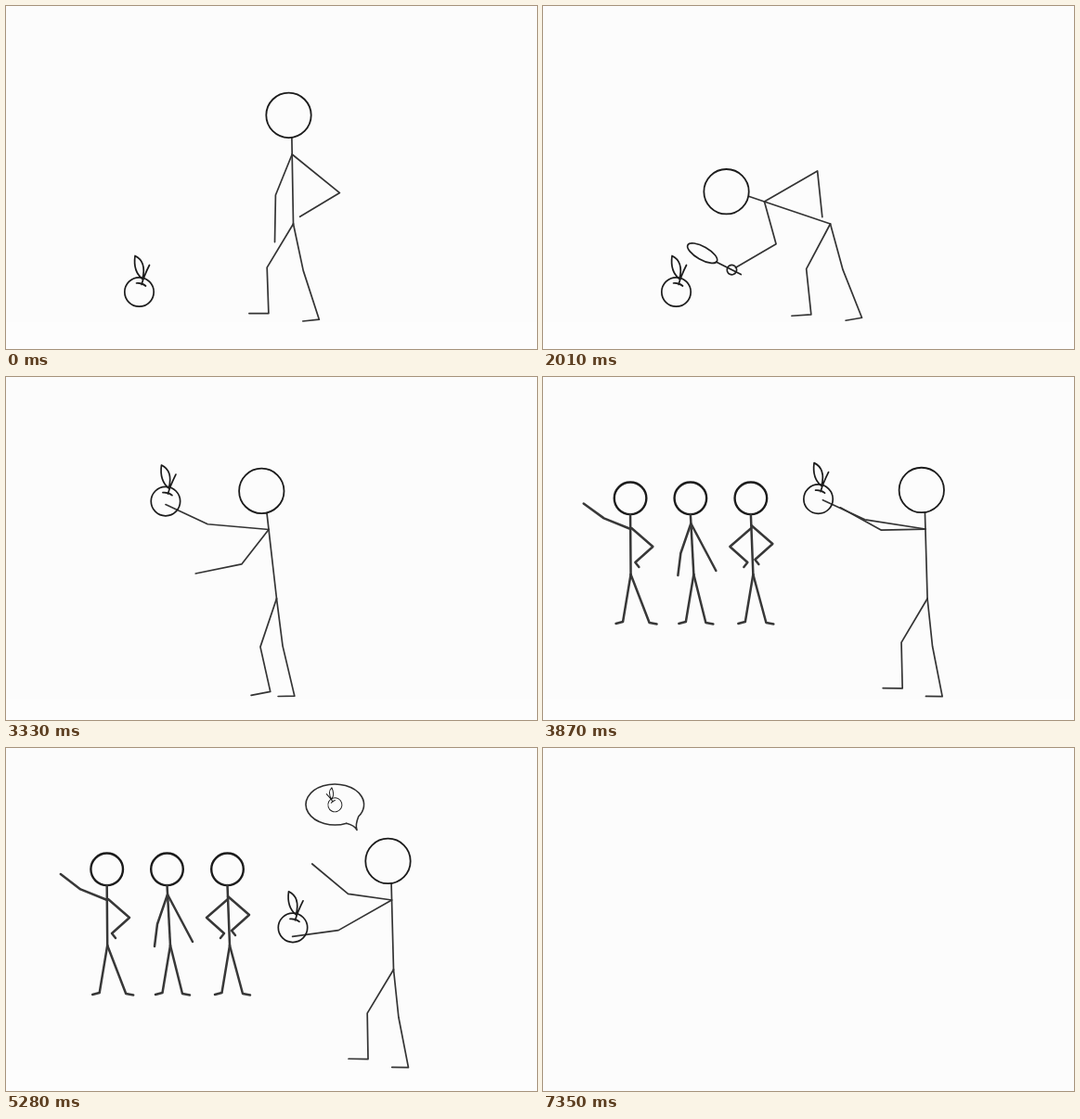
These frames come from a looping animation (572 by 370 pixels, 7.5 s). An HTML page with a canvas:

```html
<!DOCTYPE html>
<html lang="en">
<head>
<meta charset="utf-8">
<title>Sharing a discovery</title>
<style>
html, body { margin: 0; width: 100%; height: 100%; overflow: hidden; background: #fcfcfc; }
canvas { display: block; }
</style>
</head>
<body>
<canvas id="stage" width="572" height="370"></canvas>
<script>
const ctx = document.getElementById('stage').getContext('2d');
const LOOP = 7500, CUT = 2400, TAU = Math.PI * 2;

const linear = u => u;
const easeIn = u => u * u;
const easeOut = u => Math.sin(u * Math.PI / 2);
const smooth = u => u * u * (3 - 2 * u);
const span = (t, a, b) => Math.max(0, Math.min(1, (t - a) / (b - a)));
const mix = (a, b, u) => Array.isArray(a) ? a.map((v, i) => mix(v, b[i], u)) : a + (b - a) * u;

// Poses give joint angles in degrees: 0 points right, 90 points down.
// Arms are [upper, forearm], legs are [thigh, shin].
const stand = {
  hip: [309.5, 235], torso: -91, long: [39, 149], short: [112, 91],
  front: [121, 88], back: [78, 72], grip: [0, 0],
};
const lean = { ...stand, torso: -96.6, long: [34, 145], short: [107, 85], front: [120, 86.5], back: [77, 71] };
const bend = { ...stand, torso: -161.3, long: [-30, 84], short: [74.6, 149.7], front: [118, 84], back: [74.7, 68.4] };
const rise = { ...stand, torso: -94, short: [115, 160] };

const show = {
  hip: [291.5, 239], torso: -96.5, long: [185, 205], short: [128, 168.5],
  front: [108.6, 77.4], back: [82.7, 76.7], grip: [0, -3.5],
};
const low = { ...show, long: [140, 172], short: [118, 155] };
const offer = {
  hip: [417.5, 239], torso: -91.5, long: [189, 205], short: [180, 210],
  front: [121, 89], back: [84, 79], grip: [-5, -1],
};
const tell = { ...offer, long: [146, 168.5], short: [189, 221], grip: [1, -10.5] };

// Each key: time, pose, easing on the way to it
const findScene = [
  [0, stand], [700, stand], [900, lean, easeIn], [1590, bend, easeOut], [2010, bend], [2370, rise, smooth],
];
const shareScene = [
  [CUT, low], [3100, show, smooth], [3330, show], [3930, offer, smooth], [4800, offer], [5400, tell, smooth],
];

function poseAt(keys, t) {
  const next = keys.findIndex(k => k[0] > t);
  if (next < 0) return keys[keys.length - 1][1];
  const [start, from] = keys[next - 1], [end, to, ease = linear] = keys[next];
  const u = ease(span(t, start, end)), pose = {};
  for (const part in from) pose[part] = mix(from[part], to[part], u);
  return pose;
}

function pen(width, color) {
  ctx.lineWidth = width;
  ctx.strokeStyle = color;
}
function line(...points) {
  ctx.beginPath();
  points.forEach(p => ctx.lineTo(...p));
  ctx.stroke();
}
function oval(x, y, rx, ry = rx) {
  ctx.beginPath();
  ctx.ellipse(x, y, rx, ry, 0, 0, TAU);
  ctx.stroke();
}
function step([x, y], degrees, length) {
  const a = degrees * TAU / 360;
  return [x + length * Math.cos(a), y + length * Math.sin(a)];
}
function limb(start, angles, lengths) {
  const points = [start];
  angles.forEach((a, i) => points.push(step(points[i], a, lengths[i])));
  line(...points);
  return points;
}

// Returns the joints of both arms
function man({ hip, torso, long, short, front, back }) {
  const shoulder = step(hip, torso, 75);
  pen(1.7, '#343434');
  line(hip, step(hip, torso, 93));
  limb(hip, [...front, front[1] + 92], [55, 49.5, 21]);
  limb(hip, [...back, back[1] + 102], [51.5, 55.5, 17.7]);
  const arms = {
    long: limb(shoulder, long, [66, 50]),
    short: limb(shoulder, short, [47.5, 50.5]),
  };
  pen(1.8, '#1c1c1c');
  oval(...step(shoulder, torso - 4, 42.3), 24.2);
  return arms;
}

function magnifier(hand, angle) {
  ctx.save();
  ctx.translate(...step(hand, angle, 4.7));
  ctx.rotate((angle + 57) * TAU / 360);
  pen(1.7, '#222');
  oval(0, 0, 5.2);
  line([-11, 0], [19, 0]);
  ctx.rotate(0.05);
  oval(36.5, 0, 18, 7);
  ctx.restore();
}

function apple(x, y, width = 1.7) {
  ctx.save();
  ctx.translate(x, y);
  pen(width, '#1c1c1c');
  oval(0, 0, 15.7);
  ctx.beginPath();
  ctx.moveTo(-4.5, -39);
  ctx.bezierCurveTo(-6, -28, -4, -20, 3.5, -14);
  ctx.bezierCurveTo(6, -24, 6, -34, -4.5, -39);
  ctx.moveTo(11, -29);
  ctx.quadraticCurveTo(5, -17, 2.5, -8);
  ctx.moveTo(-3, -9.5);
  ctx.quadraticCurveTo(3, -10, 7, -6.5);
  ctx.stroke();
  ctx.restore();
}

function bystander(x, sway, stride) {
  const hip = x + sway;
  pen(2.4, '#1c1c1c');
  oval(x, 130.8, 17.3);
  pen(2.5, '#383838');
  line([x, 148], [hip, 213]);
  line([hip, 213], [hip - 8.5, 264], [hip - 16, 266]);
  line([hip, 213], [hip + stride, 265], [hip + stride + 8, 266.5]);
}
function akimbo(x, y, side) {
  line([x, y], [x + 23 * side, y + 20], [x + 4 * side, y + 37], [x + 8 * side, y + 42]);
}

function crowd(t) {
  const wave = -115 - 30 * Math.sin((t - 4400) * TAU / 743);
  ctx.save();
  ctx.translate(-270 * (1 - smooth(span(t, 3330, 3960))), 0);
  ctx.filter = 'blur(0.6px)';

  bystander(108.7, 0.5, 20);
  limb([109, 164], [202, wave], [31, 27]);
  akimbo(110, 163, 1);

  bystander(173.5, 3.5, 13);
  line([160, 214], [163, 190], [174, 158], [201, 209]);

  bystander(238.5, 2.5, 14);
  akimbo(239, 160, 1);
  akimbo(239, 163, -1);
  ctx.restore();
}

// Balloon outline whose gap between two angles opens into a curved tail
function balloon(x, y, rx, ry, from, to, tip) {
  const at = a => [x + rx * Math.cos(a), y + ry * Math.sin(a)];
  const bow = mix(tip, mix(at(from), at(to), 0.5), 0.45);
  pen(1.6, '#303030');
  ctx.beginPath();
  ctx.ellipse(x, y, rx, ry, 0, from, to + TAU);
  ctx.quadraticCurveTo(...bow, ...tip);
  ctx.quadraticCurveTo(...bow, ...at(from));
  ctx.stroke();
}

// Grows a bubble from its tail tip and shrinks it back
function pop(t, start, end, tip, drawBubble) {
  const size = smooth(span(t, start, start + 210)) * (1 - smooth(span(t, end - 150, end)));
  if (!size) return;
  ctx.save();
  ctx.translate(...tip);
  ctx.scale(size, size);
  ctx.translate(-tip[0], -tip[1]);
  drawBubble(tip);
  ctx.restore();
}

function appleBubble(tip) {
  balloon(354.3, 61, 31.3, 22, 1.16, 0.62, tip);
  ctx.translate(354.4, 61.3);
  ctx.rotate(-0.3);
  ctx.scale(-0.48, 0.48);
  apple(0, 0, 2);
}

function murmurBubble(tip) {
  balloon(267, 73.3, 26, 19.6, 2.58, 1.94, tip);
  for (const y of [70, 77.5]) {
    ctx.beginPath();
    for (let x = 254; x <= 278; x++) ctx.lineTo(x, y + 2.4 * Math.cos((x - 253) * TAU / 17));
    ctx.stroke();
  }
}

function draw(t) {
  ctx.globalAlpha = 1;
  ctx.fillStyle = '#fcfcfc';
  ctx.fillRect(0, 0, 572, 370);
  ctx.globalAlpha = 1 - span(t, 6500, 7200);
  ctx.lineCap = ctx.lineJoin = 'round';
  ctx.fillStyle = '#fdfdfd';
  ctx.fillRect(0, t < CUT ? 341 : 347, 572, 30);

  const finding = t < CUT;
  const pose = poseAt(finding ? findScene : shareScene, t);
  const arms = man(pose);
  if (finding) {
    apple(143.5, 308.5);
    if (t > 1100) magnifier(arms.short[2], pose.short[1]);
    return;
  }
  if (t > 3330) crowd(t);
  const [x, y] = arms.long[2];
  apple(x + pose.grip[0], y + pose.grip[1]);
  pop(t, 4050, 5700, [378, 88.5], appleBubble);
  pop(t, 5700, LOOP, [247.5, 98], murmurBubble);
}

function tick(now) {
  draw(now % LOOP);
  requestAnimationFrame(tick);
}
requestAnimationFrame(tick);
</script>
</body>
</html>
```
